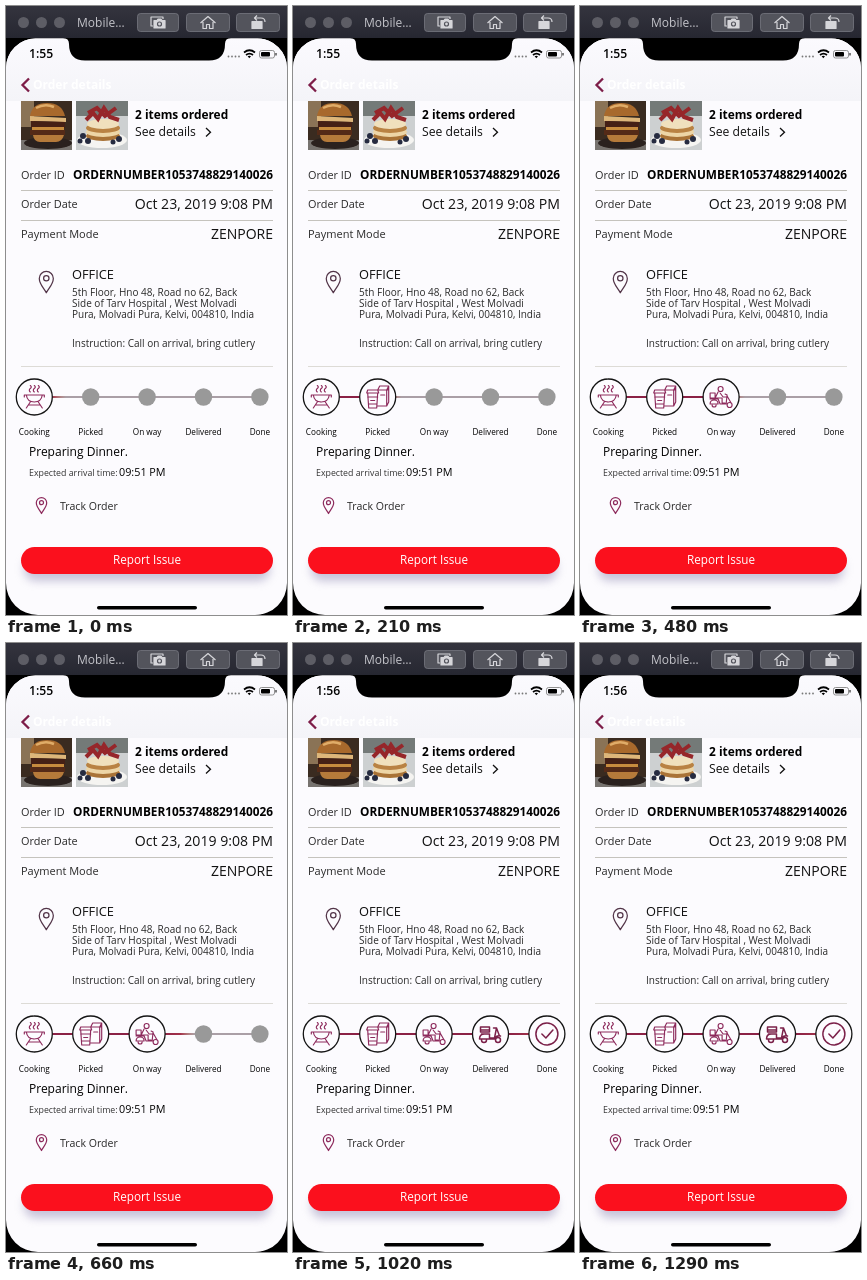
Write an HTML page that moves like this. It is 281x609 px and loops after 1.32 s.

```html
<!DOCTYPE html>
<html lang="en">
<head>
<meta charset="utf-8">
<title>Order status</title>
<style>
html, body { margin: 0; width: 100%; height: 100%; overflow: hidden; background: #000; }
svg { display: block; width: 281px; height: 609px; font-family: "Open Sans", "Noto Sans", sans-serif; }
.ink { fill: none; stroke: #8d2a5c; stroke-width: 1.15; stroke-linecap: round; stroke-linejoin: round; }
</style>
</head>
<body>
<svg id="stage" viewBox="0 0 281 609">
  <defs>
    <linearGradient id="bar" x2="0" y2="1"><stop stop-color="#34343e"/><stop offset="1" stop-color="#262731"/></linearGradient>
    <linearGradient id="head" x2="0" y2="1"><stop stop-color="#fbfafe"/><stop offset="1" stop-color="#f4f4f8"/></linearGradient>
    <linearGradient id="trail" gradientUnits="userSpaceOnUse" x1="28" x2="60" y1="0" y2="0">
      <stop stop-color="#8b2145"/><stop offset=".6" stop-color="#a3324a"/><stop offset="1" stop-color="#c9705c" stop-opacity="0"/>
    </linearGradient>
    <filter id="soft" x="-10%" y="-60%" width="120%" height="240%"><feGaussianBlur stdDeviation="5"/></filter>
    <filter id="blur"><feGaussianBlur stdDeviation=".6"/></filter>
    <clipPath id="shotA"><path d="M15 95h51v49H15z"/></clipPath>
    <clipPath id="shotB"><path d="M70 95h52v49H70z"/></clipPath>
    <path id="pin" d="M0 10C-2 6-6.500 2-6.500-3.300a6.500 6.500 0 0 1 13 0C6.500 2 2 6 0 10ZM2.500-3.500a2.500 2.500 0 1 1-5 0a2.500 2.500 0 1 1 5 0"/>
  </defs>

  <rect width="281" height="609"/>
  <rect width="281" height="32" fill="url(#bar)"/>
  <g fill="#5d5d65"><circle cx="17.500" cy="16.500" r="5.500"/><circle cx="35.500" cy="16.500" r="5.500"/><circle cx="53.500" cy="16.500" r="5.500"/></g>
  <g fill="#53545c" stroke="#777880" stroke-width=".8">
    <rect x="131.500" y="7.500" width="41" height="18" rx="3"/><rect x="180.500" y="7.500" width="43" height="18" rx="3"/><rect x="230.500" y="7.500" width="43" height="18" rx="3"/>
  </g>
  <g fill="none" stroke="#d6d6da" stroke-width="1.200" stroke-linejoin="round">
    <path d="M147 20h-2v-9h12v2"/>
    <path d="M148 14.500h3l1-1.500h3l1 1.500h3v7.500h-11z" fill="#d6d6da"/><circle cx="153.500" cy="18" r="2" stroke="#53545c"/>
    <path d="M194.500 17l7.500-6.500l7.500 6.500M197 16v6.500h3.500v-4h3v4h3.500V16"/>
    <path d="M246 15.500h10v7h-10z" fill="#d6d6da"/><path d="M249 12h6q4 0 4 4M251 9.500l-2.500 2.500l2.500 2.500"/>
  </g>

  <path d="M0 609V62A29.500 29.500 0 0 1 29.500 32.500H251.500A29.500 29.500 0 0 1 281 62V577A32 32 0 0 1 249 609H32A32 32 0 0 1 0 577Z" fill="#fcfbfe"/>
  <path d="M0 95V62A29.500 29.500 0 0 1 29.500 32.500H251.500A29.500 29.500 0 0 1 281 62V95Z" fill="url(#head)"/>
  <path d="M57 32Q63 32 63 38Q63 54.500 79 54.500H203Q219 54.500 219 38Q219 32 225 32Z"/>
  <g fill="#777"><circle cx="222.500" cy="50.500" r=".9"/><circle cx="226" cy="50.500" r=".9"/><circle cx="229.500" cy="50.500" r=".9"/><circle cx="233" cy="50.500" r=".9"/></g>
  <path d="M238 46.500q5.500-4.500 11 0M240 49q3.500-2.800 7 0" fill="none" stroke="#000" stroke-width="1.700"/><path d="M241.600 50.300q1.700-1.200 3.400 0l-1.700 1.900z"/>
  <rect x="253.500" y="44.500" width="15" height="7.500" rx="2" fill="none" stroke="#777" stroke-width=".8"/><rect x="255" y="46" width="9" height="4.500" rx="1"/><path d="M269.500 47v2.500h1V47z"/>
  <path d="M23 72.500l-6.500 6.500l6.500 6.500" fill="none" stroke="#7d1d48" stroke-width="2.300"/>

  <g clip-path="url(#shotA)">
    <path d="M15 95h51v49H15z" fill="#3a2b20"/><path d="M15 95h13v26H15z" fill="#8a7356"/><path d="M15 134h51v10H15z" fill="#77736f"/>
    <g filter="url(#blur)"><ellipse cx="42" cy="137" rx="24" ry="6" fill="#2a211e"/>
    <path d="M24 110q2-13 17-13t18 13z" fill="#a8692c"/><path d="M24 110l36 2v4l-36-1z" fill="#ddb67a"/><path d="M25 115l34 1v6H25z" fill="#452015"/>
    <path d="M26 121h32v3H26z" fill="#c68b3e"/><path d="M24 124h35v5H24z" fill="#542a17"/><path d="M27 129h31q-2 7-8 7H34q-6 0-7-7z" fill="#b57a3a"/><path d="M30 102q9-5 18-1" fill="none" stroke="#e0ac68" stroke-width="2.500"/></g>
  </g>
  <g clip-path="url(#shotB)">
    <path d="M70 95h52v49H70z" fill="#cdd0d1"/><path d="M70 95h52v15H70z" fill="#747a78"/>
    <g filter="url(#blur)"><ellipse cx="96" cy="134" rx="25" ry="8" fill="#f5f4f1"/>
    <ellipse cx="97" cy="130" rx="17" ry="5" fill="#a97337"/><ellipse cx="97" cy="126" rx="17" ry="5" fill="#edd5a6"/><ellipse cx="97" cy="122" rx="17" ry="5" fill="#b98243"/><ellipse cx="97" cy="118" rx="16" ry="5" fill="#f0e0bd"/>
    <path d="M80 114l7-7l5 6l6-11l6 9l9 3M82 107l9-5l8 8l11-8" fill="none" stroke="#96262a" stroke-width="4"/>
    <g fill="#262b40"><circle cx="77" cy="130" r="3"/><circle cx="82" cy="135" r="3"/><circle cx="113" cy="133" r="3"/><circle cx="107" cy="136" r="2.500"/><circle cx="74" cy="135" r="2.500"/></g></g>
  </g>
  <path d="M200 122l4.500 4.200l-4.500 4.300" fill="none" stroke="#111" stroke-width="1.300"/>
  <g stroke="#c5c3bd" stroke-width="1"><path d="M15 184.500h252M15 214.500h252"/><path d="M15 360.500h252" stroke="#dddbd6"/></g>
  <use href="#pin" transform="translate(40.300 276) scale(1.080)" class="ink" style="stroke:#523448"/>
  <use href="#pin" transform="translate(35.500 499.500) scale(.8)" class="ink" style="stroke-width:1.500"/>

  <path d="M28 391h226" stroke="#8f8088" stroke-width="1.300"/>
  <rect id="fill" x="28" y="390" height="2" fill="url(#trail)"/>
  <g id="steps"></g>

  <rect x="18" y="550" width="246" height="25" rx="12" fill="#a9a4c4" opacity=".65" filter="url(#soft)"/>
  <rect x="15" y="541" width="252" height="27" rx="13.500" fill="#fb101d"/>
  <rect x="91" y="600" width="100" height="3.500" rx="1.750"/>
  <g id="words"></g>
</svg>
<script>
const NS = "http://www.w3.org/2000/svg";
const el = id => document.getElementById(id);

function add(parent, tag, attrs, text) {
  const node = document.createElementNS(NS, tag);
  for (const k in attrs) node.setAttribute(k, attrs[k]);
  if (text) node.textContent = text;
  parent.appendChild(node);
  return node;
}

function say(text, x, y, size, opt = {}) {
  return add(el("words"), "text", { x, y, "font-size": size, fill: "#111", ...opt }, text);
}

const bold = { "font-weight": 700, fill: "#000" };
const medium = { "font-weight": 500, fill: "#000" };
const right = { "text-anchor": "end" };
const mid = { "text-anchor": "middle" };
const soft = { fill: "#2a2a2a" };

say("Mobile…", 71, 21, 12, { fill: "#c4c4ca", "font-weight": 500 });
const clock = say("1:55", 23, 52, 12.2, { "font-weight": 600, fill: "#000" });
say("Order details", 27, 83, 12, { ...bold, fill: "#fff" });
say("2 items ordered", 129, 113, 11.9, bold);
say("See details", 129, 130, 12.2);
say("Order ID", 15, 173, 10.9, soft);
say("ORDERNUMBER1053748829140026", 267, 173, 11.8, { ...bold, ...right });
say("Order Date", 15, 202, 10.9, soft);
say("Oct 23, 2019 9:08 PM", 267, 203, 14.1, right);
say("Payment Mode", 15, 232, 11, soft);
say("ZENPORE", 267, 233, 14, right);
say("OFFICE", 66, 273, 12.8);
[
  ["5th Floor, Hno 48, Road no 62, Back", 290],
  ["Side of Tarv Hospital , West Molvadi", 300.5],
  ["Pura, Molvadi Pura, Kelvi, 004810, India", 311.5],
  ["Instruction: Call on arrival, bring cutlery", 341]
].forEach(([line, y]) => say(line, 66, y, 10, soft));
say("Preparing Dinner.", 23, 450, 12, medium);
say("Expected arrival time:", 23, 469.5, 8.8, { fill: "#333" });
say("09:51 PM", 113, 469.5, 10.8, medium);
say("Track Order", 54, 504, 10.6, soft);
say("Report Issue", 141, 558, 11.7, { ...mid, fill: "#fff" });

// Icons are drawn around the centre of each step.
const icons = [
  "M-10-2H10M-8-2Q-7 5 0 5T8-2M-10-2v2M10-2v2M-4 5l-4 6M4 5l4 6M-6 8H6M-4-5q-2-2 0-3.500t0-3M0-5q-2-2 0-3.500t0-3M4-5q-2-2 0-3.500t0-3",
  "M-11-4H1M-10-7H0l1 3M-10-7l-1 3M-10-4l1 15h8l1-15M-10 0H0M-9 7H-1M-7 3.500h4M0-7l2-4h9l-1 4M1-7H9V9H0M9-7l2-4V5L9 9M3-2h4",
  "M-3-8a2.500 2.500 0 1 1 5 0a2.500 2.500 0 1 1-5 0M-3-5l-3 6h7v5h3M-1-4l3 4h4M-11-4h5v5h-5zM-11 2H-3l2 5H5l1-9l-2-1M-11 7q0-4 4-4t4 4zM6-1l4 7M-9 8a2 2 0 1 0 4 0M6 8a2.500 2.500 0 1 0 5 0a2.500 2.500 0 1 0-5 0",
  "M-10-7H-1v5h-9zM-10-4h9M-9 0H-1v4H4L6-6H3M6-6l3 8M-11 5q0-5 5-5M-11 5H5q0-4 5-3M-9 6a2.500 2.500 0 1 0 5 0M5 6a2.500 2.500 0 1 0 5 0a2.500 2.500 0 1 0-5 0",
  "M11 0a11 11 0 1 1-22 0a11 11 0 1 1 22 0M-5 0l4 4l7-8"
];
const names = ["Cooking", "Picked", "On way", "Delivered", "Done"];
const GAP = 56.4;
const steps = names.map((name, i) => {
  const x = 28.3 + GAP * i;
  const spot = add(el("steps"), "g", { transform: `translate(${x} 391)` });
  const off = add(spot, "circle", { r: 8.7, fill: "#999" });
  const on = add(spot, "g", {});
  add(on, "circle", { r: 18, fill: "#fdfcff", stroke: "#151515", "stroke-width": 1.3 });
  const icon = add(on, "path", { d: icons[i], class: "ink" });
  if (i > 2) icon.style.cssText = "stroke:#7b2049;stroke-width:1.5";
  say(name, x, 429, 8.2, { ...mid, ...medium });
  return { on, off };
});

const LOOP = 1320;
const LEAD = 240;
const reached = [0, 180, 450, 720, 960];

function draw(t) {
  let head = 28;
  steps.forEach((s, i) => {
    const on = t >= reached[i];
    s.on.style.display = on ? "" : "none";
    s.off.style.display = on ? "none" : "";
    if (!i) return;
    const p = Math.min(1, Math.max(0, (t - reached[i] + LEAD) / LEAD));
    if (p > 0) head = 52 + GAP * (i - 1) + p * 32;
  });
  el("fill").setAttribute("width", head - 28);
  el("trail").setAttribute("x1", head - 36);
  el("trail").setAttribute("x2", head);
  clock.textContent = t < 1020 ? "1:55" : "1:56";
}

const start = performance.now();
function tick() {
  draw((performance.now() - start) % LOOP);
  requestAnimationFrame(tick);
}
draw(0);
requestAnimationFrame(tick);
</script>
</body>
</html>
```
